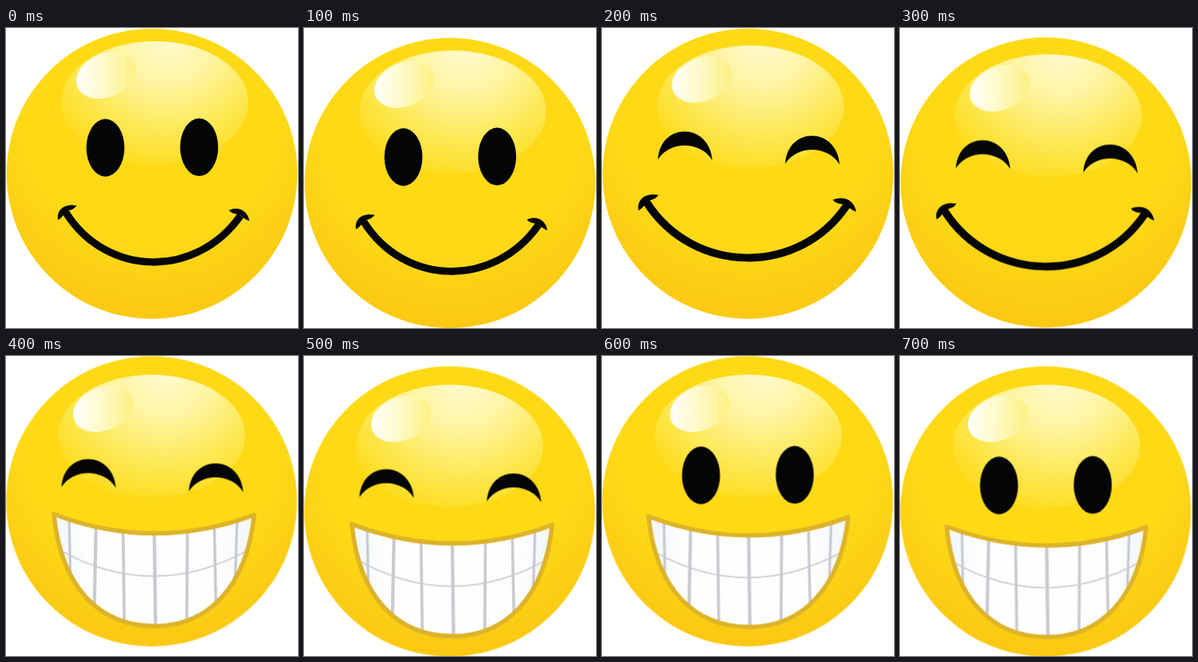
An HTML page that plays this animation: 376x387 px, repeating every 0.8 s.

```html
<!DOCTYPE html>
<html lang="en">
<head>
<meta charset="utf-8">
<title>Smiley</title>
<style>
  html, body { margin: 0; width: 100%; height: 100%; overflow: hidden; background: #fff; }
  svg { display: block; width: 376px; height: 387px; }
</style>
</head>
<body>
<svg viewBox="0 0 376 387">
  <defs>
    <radialGradient id="skin" gradientUnits="userSpaceOnUse" cx="188" cy="110" r="275">
      <stop offset=".62" stop-color="#fdd916"/>
      <stop offset=".8" stop-color="#fccf15"/>
      <stop offset="1" stop-color="#fbc714"/>
    </radialGradient>
    <radialGradient id="gloss" gradientUnits="userSpaceOnUse" cx="208" cy="8" r="172">
      <stop offset="0" stop-color="#fffbd2"/>
      <stop offset=".35" stop-color="#fef5a6"/>
      <stop offset=".7" stop-color="#fdea5c"/>
      <stop offset="1" stop-color="#fddd22"/>
    </radialGradient>
    <linearGradient id="spot" gradientUnits="userSpaceOnUse" x1="98" y1="48" x2="162" y2="76">
      <stop offset="0" stop-color="#fffef4"/>
      <stop offset=".45" stop-color="#fefac8"/>
      <stop offset="1" stop-color="#fdf084"/>
    </linearGradient>
    <linearGradient id="enamel">
      <stop offset="0" stop-color="#f1f6f9"/>
      <stop offset=".16" stop-color="#fdfefe"/>
      <stop offset=".84" stop-color="#fdfefe"/>
      <stop offset="1" stop-color="#f1f6f9"/>
    </linearGradient>
    <path id="mouth" d="M60.5 207.5Q188.500 256 317.500 208.500C308 300 258 350 190 350C120 350 70 302 60.500 207.500Z"/>
    <clipPath id="inside"><use href="#mouth"/></clipPath>
    <path id="lid" d="M72 169.500C75 121.500 138 121.500 142 170.500C126 145.500 88 145.500 72 169.500Z"/>
    <path id="capL" d="M67 247.500C65 236 73 226 91 229C87 235 82 234 79 237C74 239 73 245 67 247.500Z"/>
    <path id="capR" d="M287 235C298 230 311 234 313.500 249C307 247 304 242 300 241C295 239 291 240 287 235Z"/>
  </defs>

  <g id="face">
    <circle cx="188" cy="188" r="187.200" fill="url(#skin)"/>
    <g id="shine">
      <ellipse cx="191.500" cy="96" rx="120.500" ry="79" fill="url(#gloss)"/>
      <ellipse cx="129" cy="61" rx="40" ry="28" fill="url(#spot)" transform="rotate(-22 129 61)"/>
    </g>

    <g id="open" fill="#040506">
      <ellipse cx="128" cy="154.500" rx="24.500" ry="37.200"/>
      <ellipse cx="248.700" cy="153.800" rx="24.500" ry="37.200"/>
    </g>
    <g id="squint" fill="#040506">
      <use href="#lid"/>
      <use href="#lid" x="164" y="5.500"/>
    </g>

    <g id="smile" fill="#040506">
      <path d="M77 238C130 322 245 323 302 242" fill="none" stroke="#040506" stroke-width="9.500"/>
      <use href="#capL"/>
      <use href="#capR"/>
    </g>
    <g id="wide" fill="#040506">
      <path d="M57.500 225C118 319 254 320 315 229" fill="none" stroke="#040506" stroke-width="10"/>
      <use href="#capL" transform="translate(-25.400 -32) scale(1.080)"/>
      <use href="#capR" transform="translate(-30 -32) scale(1.140 1.080)"/>
    </g>

    <g id="grin">
      <use href="#mouth" fill="url(#enamel)"/>
      <g id="teeth" clip-path="url(#inside)" fill="none" stroke="#c9cad0">
        <path d="M66 252Q188 321 312 252" stroke-width="1.600"/>
      </g>
      <use href="#mouth" fill="none" stroke="#dcb329" stroke-width="5.600" stroke-linejoin="round"/>
    </g>
  </g>
</svg>
<script>
const STEP = 100;
const get = id => document.getElementById(id);

// Gaps between teeth: top x, bottom x, line width
const gaps = [
  [80, 83, 3.4], [115, 112, 4.2], [149, 151, 3.8], [189, 191, 4.4],
  [232, 231, 3.8], [266, 269, 3.6], [296, 291, 3.4]
];
for (const [top, bottom, width] of gaps) {
  const line = document.createElementNS('http://www.w3.org/2000/svg', 'path');
  line.setAttribute('d', `M${top} 205L${bottom} 352`);
  line.setAttribute('stroke-width', width);
  get('teeth').append(line);
}

// Holds each value for one step, then jumps to the next
function play(id, prop, values) {
  const n = values.length;
  const frames = [...values, values[n - 1]].map((v, i) => ({
    [prop]: v, offset: i / n, easing: 'step-end'
  }));
  const anim = get(id).animate(frames, { duration: n * STEP, iterations: Infinity });
  anim.startTime = document.timeline.currentTime ?? 0;
}

const move = (x, y) => `translate(${x}px, ${y}px)`;
const show = (id, pattern) =>
  play(id, 'visibility', [...pattern].map(c => c === '1' ? 'visible' : 'hidden'));

const up = move(0, 0), down = move(0, 12);
const grinUp = move(-0.5, -0.5), grinDown = move(-0.5, 12.5);
play('face', 'transform',
  [up, down, up, move(0, 11.3), grinUp, grinDown, grinUp, grinDown]);

const low = move(-0.5, 5.5), left = move(-3.5, 7.5), back = move(-2.5, 7.5);
play('shine', 'transform', [up, up, low, low, left, left, back, back]);

const big = 'translate(1.3px, -6px) scale(1.004, 1.014)';
const normal = 'translate(0px, 0px) scale(1, 1)';
play('grin', 'transform', [big, big, big, big, big, big, normal, normal]);

show('open',   '11000011');
show('squint', '00111100');
show('smile',  '11000000');
show('wide',   '00110000');
show('grin',   '00001111');
</script>
</body>
</html>
```
